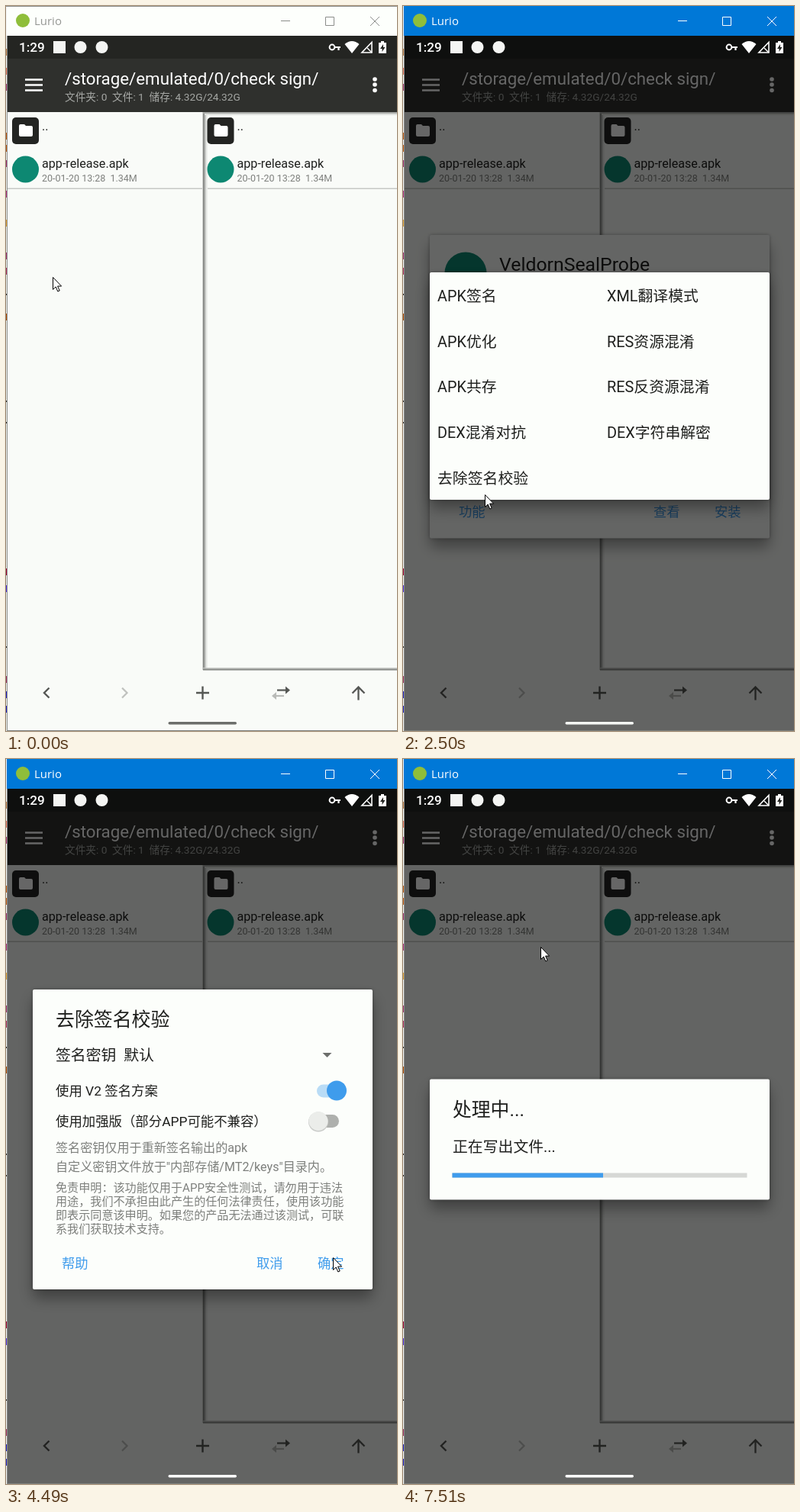
Animation of 512 by 950 pixels, one loop 8 s. Source, as an HTML page:

```html
<!DOCTYPE html>
<html lang="zh-CN">
<head>
<meta charset="utf-8">
<title>File manager</title>
<style>
html, body { margin: 0; width: 100%; height: 100%; overflow: hidden; background: #f9fbf8; }
svg { display: block; width: 512px; height: 950px; }
text { font-family: Roboto, "Noto Sans CJK SC", "Noto Sans CJK", sans-serif; white-space: pre; }
.win { font-family: "Open Sans", "Noto Sans", sans-serif; }
</style>
</head>
<body>
<svg id="stage" viewBox="0 0 512 950" xmlns="http://www.w3.org/2000/svg"></svg>
<script>
const BLUE = '#3f9cec', TEAL = '#0d8872', PAPER = '#fcfefb', INK = '#1e1f1d', GREY = '#7d7f7c';
const stage = document.getElementById('stage');

const rect = (x, y, w, h, fill, more = '') =>
  `<rect x="${x}" y="${y}" width="${w}" height="${h}" fill="${fill}" ${more}/>`;
const circle = (x, y, r, fill) => `<circle cx="${x}" cy="${y}" r="${r}" fill="${fill}"/>`;
const path = (d, fill, more = '') => `<path d="${d}" fill="${fill}" ${more}/>`;
const line = (d, color, width, more = '') =>
  path(d, 'none', `stroke="${color}" stroke-width="${width}" ${more}`);
const text = (x, y, size, fill, s, more = '') =>
  `<text x="${x}" y="${y}" font-size="${size}" fill="${fill}" ${more}>${s}</text>`;
const group = (id, body, more = '') => `<g id="${id}" ${more}>${body}</g>`;
const card = (y, h) =>
  rect(35, y + 12, 445, h, '#000', 'rx="8" opacity=".34" filter="url(#blur)"') +
  rect(35, y, 445, h, '#000', 'rx="3" opacity=".3" filter="url(#edge)"') +
  rect(35, y, 445, h, PAPER, 'rx="2"');
const buttons = (y, labels) =>
  labels.map((s, i) => text([73, 328, 408][i], y, 17.3, BLUE, s)).join('');
const dim = id => group(id, rect(2, 39, 510, 910, '#000', 'opacity=".6"'));

function edgeStrip() {
  const marks = [[60, '#b87840'], [85, '#e06a50'], [106, '#a03070'], [170, '#c05a10'], [186, '#c05a10'],
    [206, '#a03070'], [246, '#b03080'], [284, '#e0a030'], [327, '#a03070'], [347, '#b03060'],
    [381, '#333'], [407, '#b04a00'], [521, '#333'], [549, '#333'], [741, '#a00030'],
    [763, '#5030e0'], [843, '#333'], [882, '#a03060'], [902, '#2020c0'], [921, '#2020c0']];
  return rect(0, 0, 2, 950, '#f0f1ef') +
    marks.map(([y, c]) => rect(0, y - 4, 1.2, c === '#333' ? 2 : 9, c)).join('') +
    rect(1, 0, 1, 950, '#8b8d8a');
}

function titleBar(id, bg, label, glyph) {
  return group(id, rect(1, 0, 511, 39, bg) +
    (id === 'idle' ? rect(0, 0, 512, 1, '#8c8e8b') : '') +
    circle(22, 19, 9, '#8fbe3a') +
    text(37, 25, 15, label, 'Lurio', 'class="win"') +
    line('M360 19.5h12M418.5 14.5h11v11h-11zM477 14l12 12M489 14l-12 12', glyph, 1));
}

function pane(x) {
  return rect(x + 8, 146, 35, 35, '#232422', 'rx="5"') +
    path(`M${x + 17} 157q0-2 2-2h5l2 2h7q2 0 2 2v10q0 2-2 2h-14q-2 0-2-2z`, '#fff') +
    text(x + 47, 163, 16.1, INK, '..') +
    circle(x + 25.5, 214, 17.5, TEAL) +
    text(x + 47, 212, 16.15, INK, 'app-release.apk') +
    text(x + 47, 230, 12.5, GREY, '20-01-20 13:28  1.34M');
}

function files() {
  return rect(2, 39, 510, 910, '#f9fbf8') +
    rect(2, 39, 510, 30, '#242522') + rect(2, 69, 510, 70, '#2f302d') +
    line('M25 96.5h23M25 103.5h23M25 110.5h23', '#fff', 2.4) +
    text(77, 103, 22.3, '#fff', '/storage/emulated/0/check sign/') +
    text(77, 124, 13.66, '#a6a8a5', '文件夹: 0  文件: 1  储存: 4.32G/24.32G') +
    [96, 103, 110.5].map(y => circle(483, y, 2.8, '#fff')).join('') +
    group('press', rect(2, 189, 256, 50, '#ecedeb')) +
    rect(2, 238.5, 510, 1.5, '#c6c8c5') +
    rect(257, 139, 1, 731, '#d0d2cf') + rect(258, 139, 2, 731, '#8b8d8a') +
    rect(260, 139, 2, 731, '#c4c6c3') + rect(262, 139, 2, 731, '#eceeeb') +
    rect(258, 139, 254, 2, '#a9aba8') + rect(260, 141, 252, 2, '#dfe1de') +
    rect(258, 867, 254, 1.5, '#c4c6c3') + rect(258, 868.5, 254, 2, '#858784') +
    pane(0) + pane(255.5) +
    line('M56.500 893.500l-6.500 6.500l6.500 6.500', '#555754', 2.4) +
    line('M152 893.500l6.500 6.500l-6.500 6.500', '#bfc1be', 2.2) +
    line('M249 900h17M257.500 891.500v17', '#555754', 2.4) +
    line('M355 896.500h13', '#555754', 2.2) + path('M366 891.500l6 5l-6 5z', '#555754') +
    line('M352 904h12', '#b9bbb8', 2.2) + path('M354 899l-6 5l6 5z', '#b9bbb8') +
    line('M461.500 909.500v-17M453.500 900.500l8-8l8 8', '#555754', 2.3) +
    rect(0, 949, 512, 1, '#7d7f7c');
}

function statusIcons() {
  return text(17, 60, 17.2, '#fff', '1:29', 'font-weight="500"') +
    rect(62, 46, 16, 16, '#f4f5f3') + circle(97.5, 54, 8, '#f4f5f3') + circle(125.5, 54, 8, '#f4f5f3') +
    `<circle cx="427" cy="54" r="3.400" fill="none" stroke="#fff" stroke-width="2"/>` +
    line('M430 54h8M435.500 54v4', '#fff', 2.2) +
    path('M443.500 50q9.500-8 19 0l-9.500 12z', '#fff') +
    line('M479 47.500v13.500h-13z', '#fff', 1.6) + line('M473 55l6 6', '#fff', 1.4) +
    path('M491 46h4v2h3v14h-10v-14h3z', '#fff') +
    path('M494 50l-4 6h2.500v4l4-6h-2.500z', '#242522');
}

function infoCard() {
  const rows = [
    [413, '包名', 'top.kri48.veldornsealprobe', 17.5],
    [440, '版本号', '1'],
    [467, '安装包大小', '1.34M'],
    [501, '加固状态', '未加固'],
    [534, '已安装', '1.0 (1)'],
    [560.5, '数据目录', '/data/user/0/top.kri48.veldornsealpro…', 16.2],
    [587.5, 'APK 路径', '/data/app/top.kri48.veldornsealprobe-…', 16.2],
    [615, 'UID', '10228']];
  return card(300, 397.5) + circle(82, 350, 27.5, TEAL) +
    text(126, 347, 24.8, INK, 'VeldornSealProbe') + text(126, 374, 14.9, GREY, '1.0') +
    rows.map(([y, k, v, size = 18.5]) =>
      text(55, y + 7, 19.8, INK, k) + text(173, y + 6.5, size, GREY, v)).join('') +
    buttons(668.5, ['功能', '查看', '安装']);
}

function menuCard() {
  const items = ['APK签名', 'XML翻译模式', 'APK优化', 'RES资源混淆', 'APK共存', 'RES反资源混淆',
    'DEX混淆对抗', 'DEX字符串解密', '去除签名校验'];
  return card(349, 298) + items.map((s, i) =>
    text(i % 2 ? 267 : 45, 387 + 59.7 * (i >> 1), 19.85, INK, s)).join('');
}

function signCard() {
  const notes = ['免责申明：该功能仅用于APP安全性测试，请勿用于违法',
    '用途，我们不承担由此产生的任何法律责任，使用该功能',
    '即表示同意该申明。如果您的产品无法通过该测试，可联', '系我们获取技术支持。'];
  return card(302, 393) + text(65, 350, 24.9, INK, '去除签名校验') +
    text(65, 395, 19.85, INK, '签名密钥  默认') + path('M414.500 385h12l-6 6z', '#6c6e6b') +
    text(65, 441, 17.4, INK, '使用 V2 签名方案') +
    rect(407, 426.5, 36, 17, '#b9dcf6', 'rx="8.500"') + circle(433, 434.5, 13, BLUE) +
    text(65, 480.5, 17.4, INK, '使用加强版（部分APP可能不兼容）') +
    rect(400, 466, 36, 17, '#aeb0ad', 'rx="8.500"') +
    circle(409, 475.5, 13, '#c9cbc8') + circle(409, 474.5, 12.5, '#ebedea') +
    text(65, 514.5, 16.1, GREY, '签名密钥仅用于重新签名输出的apk') +
    text(65, 540, 16.1, GREY, '自定义密钥文件放于"内部存储/MT2/keys"目录内。') +
    notes.map((s, i) => text(65, 567 + 18.1 * i, 15.1, GREY, s)).join('') +
    buttons(666.5, ['帮助', '取消', '确定']);
}

function workCard() {
  return card(419.5, 158) + text(65, 468, 24.8, INK, '处理中...') +
    text(65, 515, 19.85, INK, '', 'id="msg"') +
    rect(64.5, 542.5, 386, 6, '#d6d8d5') + rect(64.5, 542.5, 0, 6, BLUE, 'id="bar"');
}

stage.innerHTML =
  `<defs><filter id="blur" x="-20%" y="-30%" width="140%" height="160%"><feGaussianBlur stdDeviation="9"/></filter>
  <filter id="edge" x="-10%" y="-10%" width="120%" height="120%"><feGaussianBlur stdDeviation="2"/></filter></defs>` +
  files() + edgeStrip() +
  titleBar('idle', '#fdfffc', '#959794', '#8b8d8a') + titleBar('active', '#0078d7', '#fff', '#fff') +
  dim('dimLow') + group('info', infoCard()) + dim('dimHigh') + statusIcons() +
  group('menu', menuCard()) + group('sign', signCard()) + group('work', workCard()) +
  rect(212.5, 938, 89.5, 3.5, '#fff', 'id="pill" rx="1.700"') +
  group('cursor', path('M.5 .5v16l3.700-3.500l2.600 6l2.400-1l-2.600-5.900h5z', '#fff', 'stroke="#000" stroke-width="1"'));

const el = id => document.getElementById(id);
const show = (id, on) => el(id).setAttribute('display', on ? 'inline' : 'none');
const DEX = '正在处理 classes.dex', OUT = '正在写出文件...';
const DARK = '#6c6e6b', MID = '#b9bbb8', SOFT = '#f4f6f3', WHITE = '#fff';

// start, cursor x, cursor y, scene, nav pill, progress edge, message
const steps = [
  [0, 61, 355, 'idle', DARK],
  [500, 90, 213, 'idle', DARK],
  [1000, 117, 236, 'press', DARK],
  [1500, 50, 548, 'info', MID],
  [2000, 88, 657, 'info', SOFT],
  [2500, 107, 640, 'menu', SOFT],
  [3010, 125, 605, 'menu', WHITE],
  [3500, 127, 611, 'menu', WHITE],
  [4000, 250, 571, 'sign', MID],
  [4490, 428, 653, 'sign', WHITE],
  [4990, 380, 575, 'work', MID, 92, DEX],
  [5510, 147, 238, 'work', SOFT, 227, DEX],
  [5990, 180, 246, 'work', WHITE, 362, DEX],
  [6510, 180, 246, 'work', WHITE, 450.5, DEX],
  [7510, 180, 246, 'work', WHITE, 262, OUT]];

function update(t) {
  const [, x, y, scene, pill, edge = 64.5, msg = ''] = steps.filter(s => s[0] <= t).pop();
  show('idle', scene === 'idle');
  show('active', scene !== 'idle');
  for (const id of ['press', 'menu', 'sign', 'work']) show(id, scene === id);
  show('info', scene === 'info' || scene === 'menu');
  show('dimHigh', scene === 'menu');
  show('dimLow', ['info', 'sign', 'work'].includes(scene));
  el('cursor').setAttribute('transform', `translate(${x} ${y})`);
  el('pill').setAttribute('fill', pill);
  el('bar').setAttribute('width', edge - 64.5);
  el('msg').textContent = msg;
}

const start = performance.now();
function tick() {
  update((performance.now() - start) % 8000);
  requestAnimationFrame(tick);
}
tick();
</script>
</body>
</html>
```
